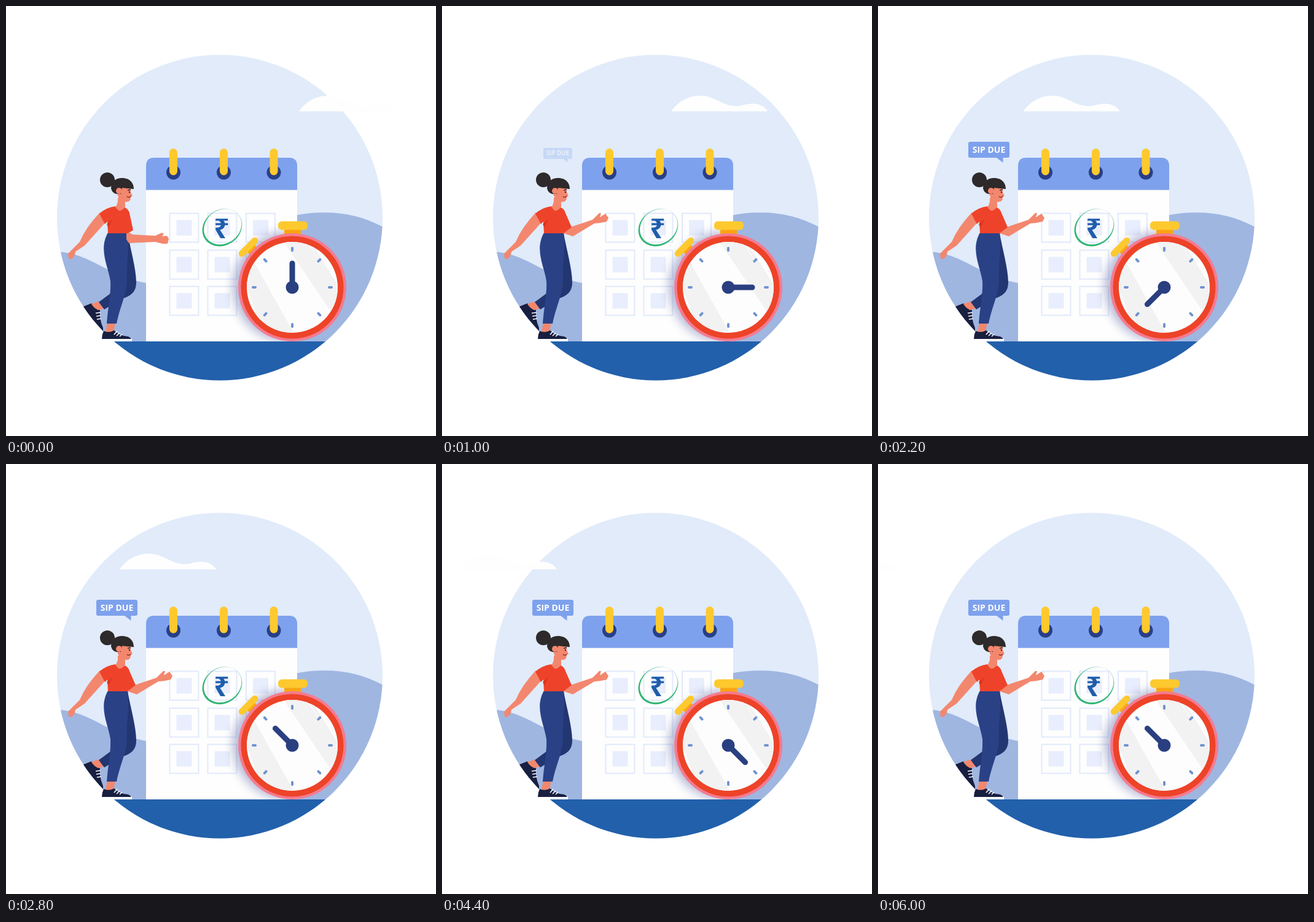
Write an HTML page that moves like this. It is 700 px wide and 700 px high and loops after 6.4 s.

```html
<!DOCTYPE html>
<html lang="en">
<head>
<meta charset="utf-8">
<title>Payment due reminder</title>
<style>
html, body { margin: 0; width: 100%; height: 100%; overflow: hidden; background: #fff; }
svg { display: block; width: 100vw; height: 100vh; }
text { font-family: "Open Sans", "Noto Sans", sans-serif; font-weight: 700; text-anchor: middle; }
.skin { fill: #f3876e; }
.hair { fill: #2e292a; }
.shoe { fill: #181f40; }
.lace { stroke: #fff; stroke-width: 1.6; fill: none; }
</style>
</head>
<body>
<svg viewBox="0 0 700 700">
  <defs>
    <clipPath id="disc"><circle cx="348" cy="344.5" r="265"/></clipPath>
    <clipPath id="page"><rect x="228" y="300" width="246" height="246"/></clipPath>
    <filter id="blur" x="-30%" y="-30%" width="160%" height="160%"><feGaussianBlur stdDeviation="8"/></filter>
    <linearGradient id="pen" x1="0" y1="0.8" x2="1" y2="0.2">
      <stop offset="0.45" stop-color="#2fb574"/>
      <stop offset="1" stop-color="#c9dcec"/>
    </linearGradient>
    <clipPath id="face"><circle cx="466" cy="458" r="74"/></clipPath>
  </defs>

  <g clip-path="url(#disc)">
    <rect width="700" height="700" fill="#e1ebfa"/>
    <path d="M80 400C135 400 165 440 228 451V550H80Z M470 341C530 330 575 338 620 363V550H470Z" fill="#9fb6e1"/>
    <rect y="546" width="700" height="100" fill="#2260ab"/>
  </g>
  <path id="cloud" d="M0 171.500C12 154 30 146 47 146C72 146 82 163 107 163C115 163 122 159 132 159C144 159 153 164 157 171.500Z" fill="#fefefe"/>

  <!-- calendar -->
  <path d="M228 299H474V546H228Z" fill="#fefefe"/>
  <path d="M228 299.500V260Q228 247 241 247H461Q474 247 474 260V299.500Z" fill="#7ea1ed"/>
  <g id="rings"></g>
  <g id="cells"></g>
  <path d="M328 380C313 361 323 331 353 329.500" fill="none"/>
  <g transform="translate(352 360.500) rotate(-35)">
    <path fill="url(#pen)" fill-rule="evenodd" d="M-34 0A34 29 0 0 1 34 0A34 29 0 0 1 -34 0Z M-31 -.5A32.200 27.200 0 0 1 33.400 -.5A32.200 27.200 0 0 1 -31 -.5Z"/>
  </g>
  <text x="351" y="378" font-size="44.500" fill="#1f5dab">₹</text>

  <!-- stopwatch -->
  <g clip-path="url(#page)"><circle cx="459" cy="457" r="90" fill="#404b94" opacity=".38" filter="url(#blur)"/></g>
  <path d="M396 392L405 401" stroke="#fba411" stroke-width="17"/>
  <path d="M384 403L405 382" stroke="#fdc92f" stroke-width="10.500" stroke-linecap="round"/>
  <rect x="453" y="361" width="27" height="14" fill="#fba411"/>
  <rect x="443" y="350.500" width="48" height="14" rx="6" fill="#fdc92f"/>
  <circle cx="466" cy="458" r="88" fill="#f47b90"/>
  <circle cx="466" cy="458" r="83.500" fill="#ed4328"/>
  <circle cx="466" cy="458" r="74" fill="#fdfdfd"/>
  <path clip-path="url(#face)" fill="#f2f2f2" d="M401 412L470 535H420L385 440Z M452 384H490L546 476L532 502Z M494 388L500 390L545 462L540 468Z"/>
  <g id="ticks" stroke="#6f93d0" stroke-width="4" stroke-linecap="round"></g>
  <g id="hand" fill="#2a3f80">
    <circle cx="466" cy="458" r="10.500"/>
    <rect x="461.500" y="414.500" width="9" height="44" rx="4.500"/>
  </g>

  <!-- woman -->
  <g clip-path="url(#disc)">
    <path class="shoe" d="M124 490L139 484Q144 493 153 495Q152 511 158 524V533H145Z"/>
    <path class="lace" d="M146 500L154 499M147 505L154 504M148 510L155 509"/>
  </g>
  <path class="skin" d="M139 485L154 480L161 492L150 495Q143 492 139 485Z"/>
  <path d="M186 370H198C203 398 212 428 212 450C212 466 203 472 188 477L160 494L151 482L174 465Z" fill="#223672"/>
  <path class="skin" d="M165 514H178L175 532H162Z"/>
  <path d="M166 369H198C201 400 196 420 197 440C198 468 185 490 180 517H164C166 490 171 470 170 448C167 425 150 397 166 369Z" fill="#2a4186"/>
  <rect x="157" y="541" width="48" height="5" fill="#fefefe"/>
  <path class="shoe" d="M159 529Q168 533 176 528Q184 537 199 538Q203 540 204 542H156Q156 535 159 529Z"/>
  <path class="lace" d="M176 535L181 529M180 537L185 532M185 538L189 534"/>
  <path class="skin" d="M153 336L164 350L128 390L113 400Q112 409 106 412L102 411L101 403L108 396L120 384Q130 360 153 336Z"/>
  <path class="skin" d="M182 312H194V327Q190 338 177 329Q183 322 182 312Z"/>
  <path id="arm" class="skin"/>
  <path id="shirt" fill="#ee432a"/>
  <path d="M164 355L173 347L167 361Z" fill="#d9361f"/>
  <circle class="hair" cx="165" cy="283" r="12"/>
  <path class="skin" d="M180 292H203L203 303L206 309L203 311Q203 319 196 319Q184 318 181 305Z"/>
  <path class="hair" d="M171 297C171 284 181 279 191 280C202 281 208 288 208 298L189 296L187 306L180 306Q173 305 171 297Z"/>
  <circle class="skin" cx="184" cy="301" r="5"/>
  <path d="M198 300L203 299" stroke="#2e292a" stroke-width="1.300"/>
  <circle class="hair" cx="201" cy="303" r="1.200"/>
  <path d="M197 310Q200 313 203 309.500" fill="none" stroke="#8b2a25" stroke-width="1.300"/>

  <g id="bubble">
    <path d="M150 221H211Q214 221 214 224V244Q214 247 211 247H203.500V255L193 247H150Q147 247 147 244V224Q147 221 150 221Z" fill="#7ea1ed"/>
    <text x="180.500" y="238.500" font-size="14" fill="#fff">SIP DUE</text>
  </g>
</svg>
<script>
const $ = id => document.getElementById(id);
const LOOP = 6400, FRAME = 200, TICK = 400;

const rect = (x, y, s, style) => `<rect x="${x}" y="${y}" width="${s}" height="${s}" ${style}/>`;
for (const x of [290, 352, 414.5]) for (const y of [361, 421, 480])
  $('cells').innerHTML += rect(x - 23.5, y - 23.5, 47, 'fill="none" stroke="#e1e9fb" stroke-width="2"')
    + rect(x - 12.5, y - 12.5, 25, 'fill="#e8eefd"');
for (const x of [272.5, 354.5, 436])
  $('rings').innerHTML += `<circle cx="${x}" cy="271" r="11.5" fill="#293f85"/>
    <rect x="${x - 6.5}" y="232" width="13" height="43.5" rx="6.5" fill="#fdc92f"/>`;
for (let a = 0; a < 360; a += 45)
  $('ticks').innerHTML += `<path d="M466 394V398" transform="rotate(${a} 466 458)"/>`;

const armLow = [196,366, 206,372, 243,374, 254,369, 257,371, 254,375, 262,374, 265,379, 263,387, 255,387, 243,384, 200,386, 196,380];
const armHigh = [204,362, 212,359, 245,348, 256,337, 259,337, 257,344, 266,338, 271,345, 268,351, 258,353, 248,354, 213,375, 198,370];
const cloudTimes = [0, 1000, 2200, 2800, 3600, 4400, 6400];
const cloudX = [477, 373, 236.5, 185, 107, 30, -163];

const clamp = p => Math.max(0, Math.min(1, p));
const mix = (a, b, p) => a + (b - a) * p;
const smooth = p => p * p * (3 - 2 * p);

function cloudAt(t) {
  const i = cloudTimes.findIndex(end => end > t);
  return mix(cloudX[i - 1], cloudX[i], (t - cloudTimes[i - 1]) / (cloudTimes[i] - cloudTimes[i - 1]));
}

function draw(now) {
  const t = Math.floor(now % LOOP / FRAME) * FRAME;
  $('hand').setAttribute('transform', `rotate(${Math.floor(t / TICK) * 45} 466 458)`);
  $('cloud').setAttribute('transform', `translate(${cloudAt(t)})`);

  const lift = smooth(clamp((t - 200) / 800));
  $('arm').setAttribute('d', 'M' + armLow.map((v, i) => mix(v, armHigh[i], lift)) + 'Z');
  $('shirt').setAttribute('d', `M178 326Q184 339 193 328Q199 330 201 337
    L${mix(207, 211, lift)} ${mix(365, 360, lift)}L198 370H166L165 351L161 355L152 338Q163 328 178 326Z`);

  const grow = clamp((t - 900) / 400);
  $('bubble').setAttribute('transform', `translate(207 254) scale(${mix(.6, 1, grow)}) translate(-207 -254)`);
  $('bubble').setAttribute('opacity', grow);
}

const start = performance.now();
function loop() {
  draw(performance.now() - start);
  requestAnimationFrame(loop);
}
loop();
</script>
</body>
</html>
```
